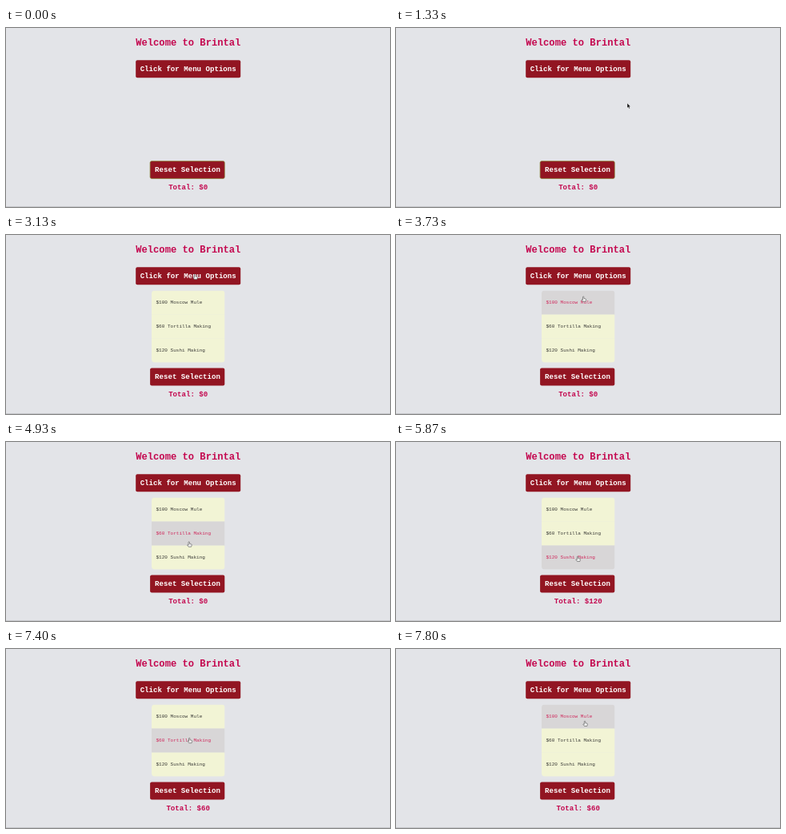
Recreate the animation shown at these times as an HTML page. Size 480 by 224 pixels, loop 8000 ms.

```html
<!DOCTYPE html>
<html lang="en">
<head>
<meta charset="utf-8">
<title>Menu</title>
<style>
  html, body { margin: 0; width: 100%; height: 100%; overflow: hidden; background: #e3e4e8; }
  svg { display: block; width: 480px; height: 224px; }
  text { font-family: "Courier New", "Liberation Mono", monospace; white-space: pre; }
  .big { font-weight: bold; font-size: 9.1px; text-anchor: middle; fill: #c4084f; }
  .title { font-size: 12.15px; }
  .button rect { fill: #921522; }
  .button text { fill: #fff; }
  .item rect { fill: #f2f4d5; }
  .item text { fill: #3b3b37; font-size: 6.02px; }
  .item.hover rect { fill: #d8d6d7; }
  .item.hover text { fill: #cf2a5d; }
</style>
</head>
<body>
<svg viewBox="0 0 480 224">
  <defs><clipPath id="round"><rect x="182" y="69.5" width="91.5" height="90" rx="4"/></clipPath></defs>
  <rect y="223" width="480" height="1" fill="#c6c7cb"/>
  <text class="big title" x="227.8" y="21.5">Welcome to Brintal</text>
  <g class="button">
    <rect x="162.2" y="40.2" width="131" height="22" rx="2"/>
    <text class="big" x="227.7" y="54">Click for Menu Options</text>
  </g>
  <g id="menu" clip-path="url(#round)"></g>
  <g class="button">
    <rect id="reset" x="180.1" y="166.6" width="93.2" height="21.8" rx="2" stroke="#8a8a3c" stroke-width=".7"/>
    <text class="big" x="227" y="180.3">Reset Selection</text>
  </g>
  <text class="big" id="total" x="227.7" y="202"></text>
  <path id="arrow" d="M0 0V6.1L1.4 4.9L2.4 7L3.4 6.5L2.5 4.5H4.2Z" fill="#111" stroke="#fff" stroke-width=".4"/>
  <path id="hand" d="M-.7 .5Q0 -.4 .7 .5V2.6L3 3.2Q3.6 3.5 3.4 4.6L2.8 6.5H-.5L-2.2 4.2Q-2 3.4 -.7 4.3Z"
        fill="#eee" stroke="#555" stroke-width=".6"/>
</svg>
<script>
const $ = id => document.getElementById(id);
const LOOP = 8, FPS = 15;

const easeIn = f => f ** 4;
const easeOut = f => 1 - (1 - f) ** 4;
const smooth = f => f * f * (3 - 2 * f);

const start = { x: 299, y: 226 };
const menuButton = { x: 236, y: 49 };
const resetButton = { x: 228, y: 172 };

// Each move runs from the last place to `to`; `bow` bends it sideways
const moves = [
  { from: 1.07, until: 1.33, to: { x: 289, y: 94 }, ease: smooth },
  { from: 1.53, until: 1.93, to: resetButton, ease: easeIn },
  { from: 2.1, until: 2.93, to: menuButton, ease: easeOut, bow: 30 },
  { from: 3.3, until: 3.93, to: resetButton, ease: easeIn },
  { from: 4, until: 4.6, to: menuButton, ease: smooth },
  { from: 4.8, until: 5.2, to: { x: 227, y: 143 }, ease: easeOut },
  { from: 6.25, until: 6.68, to: { x: 228, y: 115 }, ease: smooth, bow: 2 },
  { from: 7.27, until: 7.8, to: { x: 236, y: 90 }, ease: smooth }
];

function pointer(t) {
  let { x, y } = start;
  for (const { from, until, to, ease, bow = 0 } of moves) {
    const e = ease(Math.min(1, Math.max(0, (t - from) / (until - from))));
    x += (to.x - x) * e + 4 * bow * e * (1 - e);
    y += (to.y - y) * e;
  }
  return [x, y];
}

$('menu').innerHTML = ['$100 Moscow Mule', '$60 Tortilla Making', '$120 Sushi Making'].map((label, i) => {
  const y = 69.5 + 30 * i;
  return `<g class="item"><rect x="182" y="${y}" width="91.5" height="30.2"/>` +
    `<text x="187.5" y="${y + 16.9}">${label}</text></g>`;
}).join('');
const items = [...$('menu').children];

const inside = (x, y, l, t, r, b) => x >= l && x < r && y >= t && y < b;

function draw(seconds) {
  const t = Math.floor((seconds % LOOP + .004) * FPS) / FPS + .001;
  const [x, y] = pointer(t);
  const open = t > 3.13;
  const onMenu = open && inside(x, y, 182, 69.5, 273.5, 159.5);
  const row = onMenu ? Math.floor((y - 69.5) / 30) : -1;
  const onEdge = onMenu && Math.abs(y - 129.5) < 1;
  const onButton = inside(x, y, 162, 40, 293, 62) || inside(x, y, 180, 167, 273, 188);
  const hand = onButton || onMenu && !onEdge;

  $('menu').style.display = open ? '' : 'none';
  items.forEach((item, i) => item.classList.toggle('hover', i === row));
  $('reset').style.strokeOpacity = t < 2.13 ? 1 : 0;
  $('total').textContent = 'Total: $' + (t < 5.86 ? 0 : t < 7.06 ? 120 : 60);
  for (const id of ['arrow', 'hand']) {
    $(id).setAttribute('transform', `translate(${x} ${y})`);
    $(id).style.display = (id === 'hand') === hand ? '' : 'none';
  }
}

let began;
function frame(now) {
  began ??= now;
  draw((now - began) / 1000);
  requestAnimationFrame(frame);
}
draw(0);
requestAnimationFrame(frame);
</script>
</body>
</html>
```
